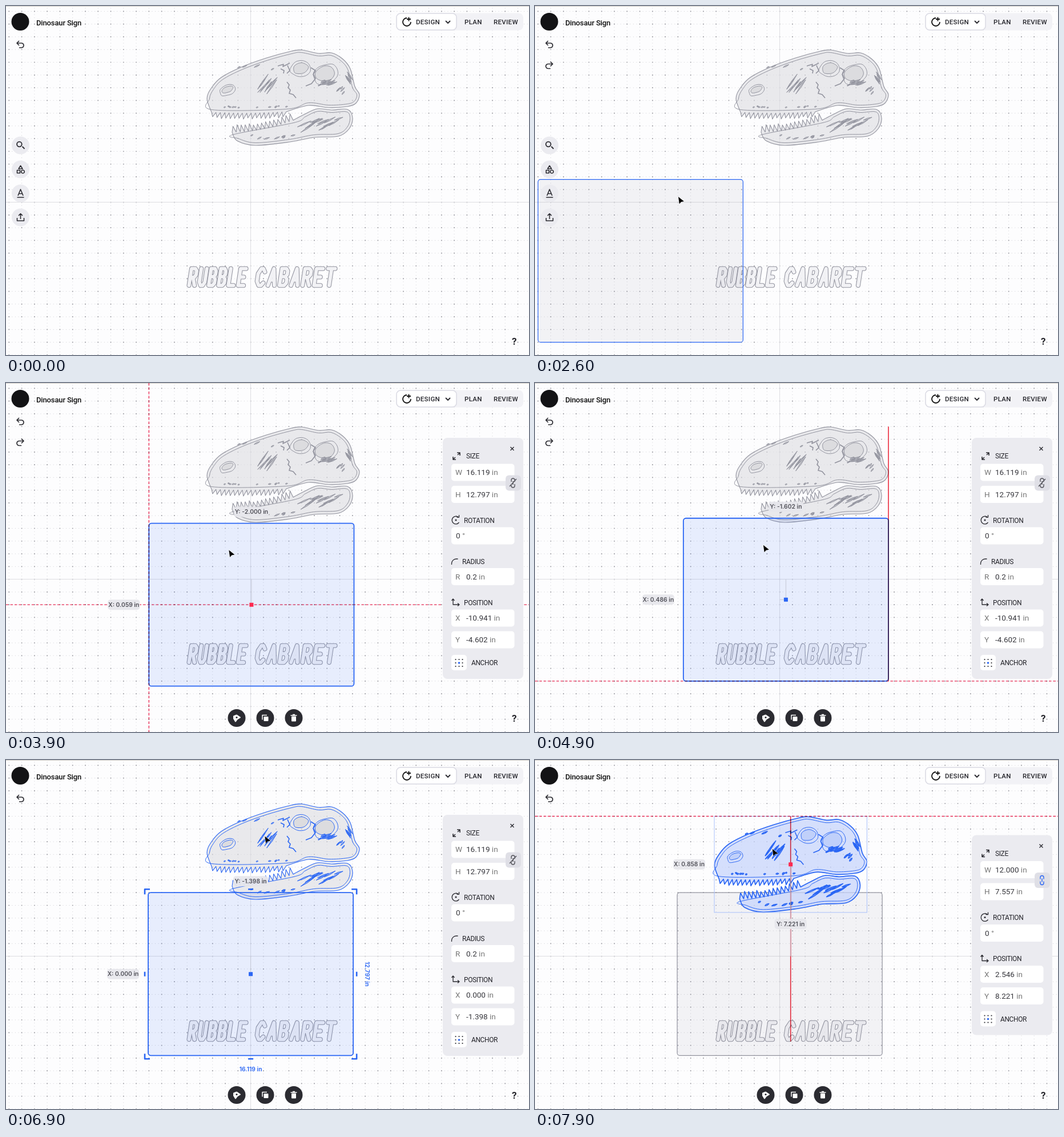
Recreate the animation shown at these times as an HTML page. Size 916x611 px, loop 8 s.

```html
<!DOCTYPE html>
<html lang="en">
<head>
<meta charset="utf-8">
<style>
html, body { margin: 0; width: 100%; height: 100%; overflow: hidden; background: #fdfdfe; }
svg { display: block; width: 916px; height: 611px; font-family: Roboto, sans-serif; }
.label { font: 600 10.3px Inter, sans-serif; text-anchor: middle; }
.head { font-size: 12px; letter-spacing: -.4px; }
.value { font-size: 13.5px; }
.tab { font-size: 11.5px; font-weight: 500; letter-spacing: .3px; }
.title { font-size: 13px; font-weight: 500; letter-spacing: -.15px; }
.help { font-size: 17px; font-weight: 700; }
.guide { mix-blend-mode: multiply; }
</style>
</head>
<body>
<svg id="stage" viewBox="0 0 916 611"></svg>
<script>
const UNIT = 22.28, CX = 428.6, CY = 343.6;   // pixels per inch, canvas origin
const BLUE = '#2a66f4', RED = '#f02e58', INK = '#2b2b31', GRAY = '#92939e';
const BOARD = { w: 16.119, h: 12.797, x: -10.941, y: -4.602 };
const SKULL = { w: 12, h: 7.557, x: 2.546, y: 8.221 };
const stage = document.getElementById('stage');

// ---- motion ----

const ease = u => 1 - (1 - u) ** 2;

// Chain of eased moves: [start, end, x, y]
const follow = (t, home, ...moves) => moves.reduce(([x, y], [start, end, tx, ty]) => {
  const u = ease(Math.min(1, Math.max(0, (t - start) / (end - start))));
  return [x + (tx - x) * u, y + (ty - y) * u];
}, home);

const boardAt = t => follow(t, [BOARD.x, BOARD.y], [2600, 2800, -4.407, -3.398], [3400, 3900, .059, -2],
  [4300, 4600, .059, -1.602], [4800, 4900, .486, -1.602], [4900, 5500, 0, -1.398]);
const skullAt = t => follow(t, [SKULL.x, SKULL.y], [7600, 7900, .858, 7.221]);

// Pixel frame of an item centred at x, y inches
function frameOf(item, [x, y]) {
  const cx = CX + x * UNIT, cy = CY - y * UNIT, w = item.w * UNIT, h = item.h * UNIT;
  return { x, y, cx, cy, w, h, l: cx - w / 2, r: cx + w / 2, t: cy - h / 2, b: cy + h / 2 };
}

// The pointer holds each item at a fixed grip while dragging
function pointerAt(t, board, skull) {
  const onBoard = [board.l + 140, board.t + 47], onSkull = [skull.cx - 32, skull.cy - 27];
  if (t < 2700) return follow(t, [0, 96], [900, 1300, 24, 67], [1900, 2300, 148, 345], [2400, 2600, 251, 334]);
  return t < 6900 ? follow(t, onBoard, [6400, 6900, ...onSkull]) : onSkull;
}

// ---- drawing helpers ----

const path = (d, stroke = INK, width = 1.6, fill = 'none', extra = '') =>
  `<path d="${d}" stroke="${stroke}" stroke-width="${width}" fill="${fill}" stroke-linejoin="round" ${extra}/>`;
const rect = (x, y, w, h, r, fill, extra = '') =>
  `<rect x="${x}" y="${y}" width="${w}" height="${h}" rx="${r}" fill="${fill}" ${extra}/>`;
const disc = (x, y, r, fill, extra = '') => `<circle cx="${x}" cy="${y}" r="${r}" fill="${fill}" ${extra}/>`;
const text = (x, y, s, cls, fill = '#25252b', extra = '') =>
  `<text x="${x}" y="${y}" class="${cls}" fill="${fill}" ${extra}>${s}</text>`;
const shift = (x, y, s) => `<g transform="translate(${x} ${y})">${s}</g>`;
const repeat = (n, f) => Array.from({ length: n }, (_, i) => f(i));

let seed = 3;
const random = () => { const v = Math.sin(++seed) * 43758.5453; return v - Math.floor(v); };
const spread = size => (random() - .5) * size;

// ---- skull ----

const parse = s => s.split(' ').map(p => p.split(',').map(Number));

// Smooth line through every point
function curve(p, closed) {
  const n = p.length, pt = i => closed ? p[(i + n) % n] : p[Math.min(n - 1, Math.max(0, i))];
  let d = 'M' + p[0];
  for (let i = 0; i < (closed ? n : n - 1); i++) {
    const [a, b, c, e] = [pt(i - 1), pt(i), pt(i + 1), pt(i + 2)];
    d += `C${b.map((v, k) => v + (c[k] - a[k]) / 6)} ${c.map((v, k) => v - (e[k] - b[k]) / 6)} ${c}`;
  }
  return d;
}

const inset = (p, gap) => p.map(([x, y], i) => {
  const a = p.at(i - 1), b = p[(i + 1) % p.length];
  const dx = b[0] - a[0], dy = b[1] - a[1], k = gap / Math.hypot(dx, dy);
  return [x - dy * k, y + dx * k];
});

const teeth = ([x0, y0], [x1, y1], sag, count, height) => repeat(count * 2 + 1, i => {
  const u = i / count / 2, tip = i % 2 ? height * (.8 + random() * .4) : 0;
  return `L${x0 + (x1 - x0) * u - (tip ? 2 : 0)} ${y0 + (y1 - y0) * u + sag * Math.sin(Math.PI * u) + tip}`;
}).join('');

function blob(cx, cy, rx, ry, tilt) {
  return curve(repeat(10, i => {
    const a = i * Math.PI / 5, k = 1 + spread(.18), x = rx * k * Math.cos(a), y = ry * k * Math.sin(a);
    return [cx + x * Math.cos(tilt) - y * Math.sin(tilt), cy + x * Math.sin(tilt) + y * Math.cos(tilt)];
  }), true);
}

// Thin chips scattered in an area, all at about one angle
const chips = (x, y, w, h, count, length, angle) => repeat(count, () => {
  const a = (angle + spread(16)) * Math.PI / 180, l = length * (.6 + random() * .7);
  const dx = l * Math.cos(a), dy = l * Math.sin(a), nx = -Math.sin(a) * 2.2, ny = Math.cos(a) * 2.2;
  return `M${x + spread(w) - dx / 2} ${y + spread(h) - dy / 2}q${dx / 2 + nx} ${dy / 2 + ny} ${dx} ${dy}` +
    `q${-dx / 2 - nx} ${-dy / 2 - ny} ${-dx} ${-dy}`;
}).join('');

const dome = parse('360,186 352,162 360,143 377,125 412,107 456,91 500,79 518,77 548,83 570,82 590,93 603,110 ' +
  '611,141 619,155 613,170 598,176 565,178 530,174 491,185');
const jaw = parse('396,221 405,236 437,244 497,238 540,230 582,228 601,215 607,196 598,181 570,182 545,180 522,190 503,200');
const bones = [curve(dome) + teeth(dome.at(-1), dome[0], 2, 17, 9) + 'Z',
  curve(jaw) + teeth(jaw.at(-1), jaw[0], 5, 15, -11) + 'Z'].join('');
const rims = curve(inset(dome, 4.5), true) + curve(inset(jaw, -4.5), true);
const sockets = [[516, 110, 18, 14, -.2], [559, 119, 22, 17, -.4], [388, 147, 15, 9, -.4]]
  .map(([x, y, rx, ry, tilt]) => [blob(x, y, rx, ry, tilt), blob(x, y - 1, rx - 5, ry - 4, tilt)]);
const marks = chips(457, 137, 20, 12, 9, 24, -50) + chips(563, 134, 20, 5, 8, 14, -28) + chips(600, 126, 6, 12, 5, 20, 62) +
  chips(586, 149, 18, 12, 5, 9, -50) + chips(440, 177, 120, 4, 13, 4, -15) + chips(548, 206, 70, 18, 15, 22, -25) +
  chips(470, 230, 80, 8, 8, 8, -20) + chips(440, 108, 80, 14, 4, 9, -30);
const cracks = 'M476 105l10-3-1 4 12-6M481 110l6 3-1 5M493 104l4 9-5 5M492 133l4 5-2 5 4 4-2 6 7 2 5 6M534 108l8 5-4 7 4 7-7 9-10 4';

function drawSkull(mode, { x, y }) {
  const ink = mode ? BLUE : GRAY, chosen = mode === 2;
  const holes = sockets.map(([outer, inner]) => path(outer, ink, 1) + path(inner, ink, 1, chosen ? '#c0d0fa' : '#dcdcdf')).join('');
  return shift((x - SKULL.x) * UNIT, (SKULL.y - y) * UNIT,
    path(bones, ink, chosen ? 1.7 : 1.1, chosen ? 'rgba(198,212,252,.72)' : 'rgba(220,220,225,.6)') +
    path(rims, ink, 1) + holes + path(marks, ink, chosen ? 1.5 : 1, ink, 'fill-opacity=".4"') + path(cracks, ink, 1.6));
}

// ---- lettering: strokes in a unit cell ----

const LETTERS = {
  R: 'M0 1V0H.7L1 .13V.37L.7 .52H0M.5 .52L1 1', U: 'M0 0V.8L.3 1H.7L1 .8V0',
  B: 'M0 0V1H.7L1 .85V.63L.7 .48H0M.7 .48L.95 .35V.14L.7 0H0', L: 'M0 0V1H.95', E: 'M1 0H0V1H1M0 .5H.8',
  C: 'M1 .2L.7 0H.4L0 .3V.75L.35 1H.7L1 .85', A: 'M0 1L.55 0L1 1M.2 .68H.85', T: 'M0 0H1.1M.55 0V1'
};
const word = (s, x, advance) => [...s].map((c, i) => {
  const cell = `transform="matrix(${advance * .56} 0 -4.5 29.5 ${x + i * advance} 459.7)" vector-effect="non-scaling-stroke" stroke-linecap="round"`;
  return path(LETTERS[c], GRAY, 8, 'none', cell) + path(LETTERS[c], '#f2f2f5', 5.9, 'none', cell);
}).join('');
const lettering = word('RUBBLE', 325, 17.2) + word('CABARET', 443, 20.2);

// ---- canvas and interface ----

function makeGrid() {
  const x0 = CX - 20 * UNIT, y0 = CY - 16 * UNIT;
  const rows = repeat(29, i => `M${x0} ${y0 + i * UNIT}H916`).join('');
  const cols = repeat(42, i => `M${x0 + i * UNIT} ${y0}V611`).join('');
  return path(rows + cols, '#d0d0d5', 1, 'none', 'stroke-dasharray="1 4.57" stroke-dashoffset=".5"') +
    path(rows, '#98989f', 1.7, 'none', 'stroke-dasharray="1.7 20.58" stroke-dashoffset=".85"') +
    path('M428.5 0V611M0 343.5H916', '#dedee2', 1) + path('M0 .5H916', '#d2cec8', 1);
}
const grid = makeGrid();

const undo = path('M-2-6l-4 4 4 4M-6-2H2a4 4 0 0 1 0 8h-4', INK, 1.7);
const header = disc(25, 27.5, 15.5, '#131315') + text(53, 34, 'Dinosaur Sign', 'title', '#111') +
  rect(683, 12.5, 223, 30, 8, '#f2f2f6') + rect(684, 13, 105, 29, 7, '#fff', 'stroke="#dadae3" stroke-width="1.5"') +
  path('M702 21a7 7 0 1 0 7 7M705.5 19.5v7M702 23h7', '#111', 1.8) + path('M770 26l4 4 4-4', INK, 1.8) +
  text(718, 31.5, 'DESIGN', 'tab') + text(803, 31.5, 'PLAN', 'tab') + text(854, 31.5, 'REVIEW', 'tab') +
  text(886, 593, '?', 'help');

const toolIcons = [
  path('M3 2l4 4M2.2-2a4.3 4.3 0 1 1-8.6 0a4.3 4.3 0 1 1 8.6 0', INK, 1.8),
  path('M0-6.5l3.5 5.5h-7zM-6 1.5h5v5h-5zM6.8 4a2.8 2.8 0 1 1-5.6 0a2.8 2.8 0 1 1 5.6 0'),
  path('M-4.5 4L0-7l4.5 11M-3 .5h6M-6 7h12'),
  path('M0 3v-9M-3.5-3L0-6.5 3.5-3M-6 1v5h12v-5')];
const tools = toolIcons.map((icon, i) => shift(25.5, 244 + i * 42, disc(0, 0, 15.5, '#ebebf0') + icon)).join('');

const actionIcons = [
  path('M-5-3l5-2 6 4-5 3-3 4-3-5z', '#fff', 2, '#fff') + disc(0, -1, 1.6, INK),
  path('M-5 3v-8h8', '#fff', 1.5) + rect(-2.5, -2.5, 8, 8, 1, '#fff'),
  rect(-4, -3, 8, 9, 1, '#fff') + path('M-5.5-4.5h11M-2-6h4', '#fff', 1.7)];
const actions = t => actionIcons.map((icon, i) => {
  const drop = t < 3500 ? Math.max(0, 8 * (i - 1) + Math.max(0, 2800 - t) / 5) : 0;
  return shift(404 + i * 50, 586.5 + drop, disc(0, 0, 15.5, INK) + icon);
}).join('');

const field = (y, name, value, unit) => rect(780, y - 14.5, 110.5, 30, 5, '#fff') + text(787, y + 5, name, 'value', '#777') +
  text(name ? 806 : 788, y + 5, `${value} <tspan fill="#777">${unit}</tspan>`, 'value', '#37373d');

function panel(item, isSkull, x, y) {
  const cut = isSkull ? 72 : 0, num = v => v.toFixed(3);
  const dots = repeat(9, i => disc(787.5 + i % 3 * 6, 484 + (i / 3 | 0) * 6, i === 4 ? 1.8 : 1.1, i === 4 ? BLUE : INK)).join('');
  const radius = path('M780.5 318v-2a8 8 0 0 1 8-8h3', INK, 1.3) + text(799, 316.5, 'RADIUS', 'head') + field(338.5, 'R', '0.2', 'in');
  const lower = path('M783 379v9h10M780.5 381l2.5-3 2.5 3M791 385.5l3 2.5-3 2.5', INK, 1.3) +
    text(802, 388.5, 'POSITION', 'head') + field(411, 'X', num(x), 'in') + field(449, 'Y', num(y), 'in') +
    rect(780, 476, 27, 27, 5, '#fff') + dots + text(815, 494, 'ANCHOR', 'head');
  return shift(0, isSkull ? 35.5 : 0, rect(765, 96, 141, 422 - cut, 8, '#ebebf0') +
    path('M883.5 112l6 6M889.5 112l-6 6', INK, 1.4) + path('M783 134l4-4M791 126l4-4M783 129v5h5M790 122h5v5', INK, 1.6) +
    text(806, 132, 'SIZE', 'head') + field(156, 'W', num(item.w), 'in') + field(194.5, 'H', num(item.h), 'in') +
    rect(875, 161.5, 27, 27, 6, '#dfdfe6') +
    path('M885 173v-3a3 3 0 0 1 6 0v3M885 177v3a3 3 0 0 0 6 0v-3M888 172v6' + (isSkull ? '' : 'M882 181l12-13'), isSkull ? BLUE : '#55555c', 1.4) +
    path('M792.5 235a6.8 6.8 0 1 0 1 9M789.5 235h4v-4', INK, 1.3) + disc(788, 240, 1.5, INK) +
    text(802, 244.5, 'ROTATION', 'head') + field(267, '', '0', '°') + (isSkull ? '' : radius) + shift(0, -cut, lower));
}

const pill = (x, y, s) => rect(x - s.length * 2.55, y - 9, s.length * 5.1, 18, 5, 'rgba(231,231,236,.95)') +
  text(x, y + 3.6, s, 'label', '#505058');

// Axis offsets, centre mark and position labels of a selected item
const measures = (f, snapped) => path(`M${f.cx} ${CY}V${f.cy}H${CX}`, '#c6c9d6', 1) +
  rect(f.cx - 3.5, f.cy - 3.5, 7, 7, .5, snapped ? '#ff2950' : BLUE) +
  pill(f.cx, f.y < 0 ? f.t - 20 : f.b + 20, `Y: ${f.y.toFixed(3)} in`) +
  pill(f.x < 0 ? f.r + 46 : f.l - 44, f.cy, `X: ${f.x.toFixed(3)} in`);

function handles({ l, t, r, b, cx, cy }) {
  const corner = (x, y, sx, sy) => `M${x + 6 * sx} ${y - 3 * sy}v${9 * sy}h${-9 * sx}`;
  const corners = [[l, t], [r, t], [l, b], [r, b]].map(([x, y]) => {
    const sx = Math.sign(x - cx), sy = Math.sign(y - cy);
    return corner(x, y, sx, sy);
  }).join('');
  return path(`${corners}M${cx - 4.5} ${t - 6}h9M${cx - 4.5} ${b + 6}h9M${l - 6} ${cy - 4}v8M${r + 6} ${cy - 4}v8`, BLUE, 2.6) +
    text(cx, b + 27.5, `${BOARD.w} in`, 'label', BLUE) +
    text(0, 0, `${BOARD.h} in`, 'label', BLUE, `transform="translate(${r + 21} ${cy}) rotate(90)"`);
}

const dashed = d => path(d, RED, 1.4, 'none', 'stroke-dasharray="4.5 3" class="guide"');
const solid = (x, y0, y1) => path(`M${x} ${y0}V${y1}`, '#ee2a3c', 1.6, 'none', 'class="guide"');
const across = y => dashed(`M0 ${y}H916`), down = x => dashed(`M${x} 0V611`);

function scene(t) {
  const during = (a, b) => t >= a && t < b;
  const board = frameOf(BOARD, boardAt(t)), skull = frameOf(SKULL, skullAt(t));
  const boardOn = during(2700, 7700), skullOn = t >= 7700, dropped = t >= 6500;
  const atCenter = during(3900, 4400), atRest = during(5500, 6500);

  const skullArt = drawSkull(skullOn ? 2 : t >= 6900 ? 1 : 0, skull);
  const boardArt = t < 1700 ? '' : rect(board.l, board.t, board.w, board.h, 4.5, boardOn ? 'rgba(42,102,244,.1)' : 'rgba(120,120,140,.08)',
    `stroke="${boardOn || during(2200, 2700) ? BLUE : GRAY}" stroke-width="${boardOn ? 1.8 : 1.2}"`);
  let s = grid + (skullOn ? lettering + boardArt + skullArt : skullArt + lettering + boardArt);

  if (during(2800, 3500) || atRest) s += across(board.t);
  if (during(3900, 4900)) s += down(board.l);
  if (atCenter) s += across(board.cy);
  if (during(4600, 5000)) s += across(board.b);
  if (during(4900, 5000)) s += solid(board.r, skull.t, board.b);
  if (atRest) s += down(board.cx);
  if (skullOn) s += rect(skull.l, skull.t, skull.w, skull.h, 0, 'none', 'stroke="#a9c0fb"');
  if (t >= 7900) s += across(skull.t) + solid(skull.cx, skull.t, 493);
  if (boardOn) s += measures(board, atCenter || atRest);
  if (boardOn && dropped) s += handles(board);
  if (skullOn) s += measures(skull, t >= 7900);

  s += header;
  if (during(1200, 2100)) s += disc(25, 66.5, 15.5, '#ebebf0');
  s += shift(25, 67, undo);
  if (during(1700, 6500)) s += shift(25, 103.5, `<g transform="scale(-1 1)">${undo}</g>`);
  if (skullOn) s += actions(t) + panel(SKULL, true, SKULL.x, SKULL.y);
  else if (boardOn) s += actions(t) + panel(BOARD, false, ...(dropped ? [board.x, board.y] : [BOARD.x, BOARD.y]));
  else s += tools;
  if (t >= 900) s += shift(...pointerAt(t, board, skull), path('M0 0L1.8 12.5L5 9L10 8Z', '#fff', 1, '#000', 'paint-order="stroke"'));
  return s;
}

// The picture advances in steps of 100 ms
let shown = -1;
function frame() {
  const t = Math.floor(performance.now() % 8000 / 100) * 100;
  if (t !== shown) stage.innerHTML = scene(shown = t);
  requestAnimationFrame(frame);
}
frame();
</script>
</body>
</html>
```
